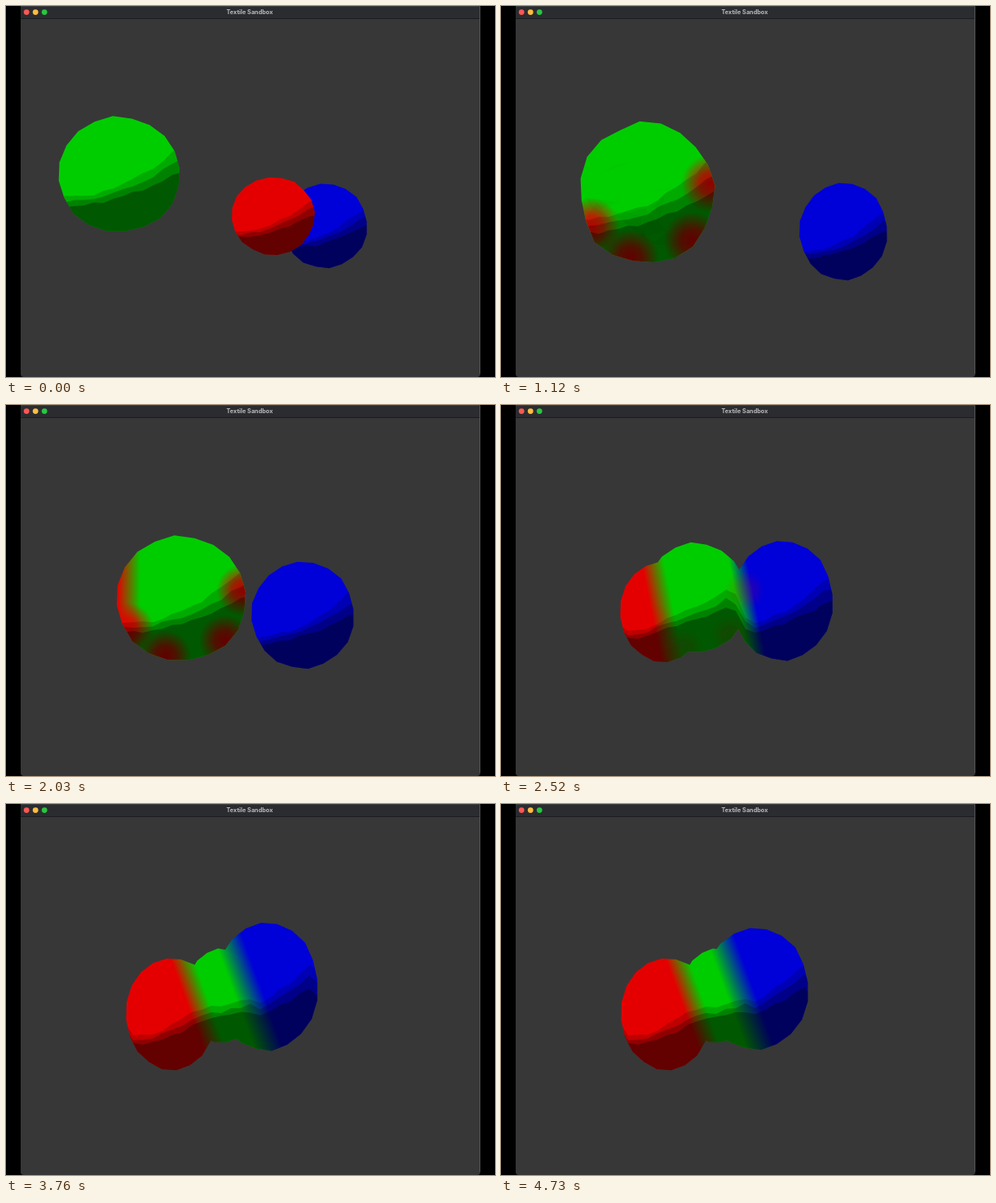
These frames come from a looping animation (600 by 456 pixels, 4.76 s). An HTML page with a canvas:

```html
<!DOCTYPE html>
<html lang="en">
<head>
<meta charset="utf-8">
<title>Textile Sandbox</title>
<style>
html, body { margin: 0; width: 100%; height: 100%; overflow: hidden; background: #000; }
canvas { display: block; }
</style>
</head>
<body>
<canvas id="stage" width="600" height="456"></canvas>
<script>
const ctx = document.getElementById('stage').getContext('2d');
const LOOP = 4760, SPLASH = 480, MERGE = 2250;
const RED = '#e40000', GREEN = '#00cd00', BLUE = '#0000d8';
const RAD = Math.PI / 180;

const clamp = v => Math.max(0, Math.min(1, v));
const noise = n => { const s = Math.sin(n * 127.1 + 3.7) * 43758.5; return (s - Math.floor(s)) * 2 - 1; };

// Key points of each ball: time, centre x and y, half width, half height.
const tracks = {
  red: [
    [0, 328, 258, 51, 48], [SPLASH, 180, 262, 50, 46],
    [2030, 195, 250, 50, 55], [3030, 203, 258, 56, 69]
  ],
  green: [
    [0, 139, 207, 75, 71], [SPLASH, 175, 222, 97, 92], [1120, 179, 230, 83, 87],
    [2030, 215, 238, 80, 77], [3030, 265, 236, 45, 58]
  ],
  blue: [
    [0, 391, 270, 52, 52], [SPLASH, 425, 280, 55, 57], [1120, 420, 277, 54, 60],
    [2030, 364, 258, 63, 66], [3030, 325, 222, 62, 82], [LOOP, 312, 227, 65, 75]
  ]
};

function ballAt(name, time) {
  const keys = tracks[name];
  const next = keys.findIndex(key => key[0] > time);
  const b = next < 0 ? keys[keys.length - 1] : keys[next];
  const a = next < 0 ? b : keys[next - 1];
  const k = next < 0 ? 0 : (time - a[0]) / (b[0] - a[0]);
  const [, x, y, rx, ry] = a.map((v, i) => v + (b[i] - v) * k);
  return { x, y, rx, ry, seed: name.length * 40, lobes: 0 };
}

// Faceted ellipse; the collision throws up five lobes.
function addOutline({ x, y, rx, ry, seed, lobes }) {
  for (let i = 0; i < 20; i++) {
    const a = (18 * i - 78) * RAD;
    const r = 1 + lobes * 0.2 * Math.cos(i * Math.PI / 2) + noise(seed + i) * (0.015 + 0.05 * lobes);
    const px = x + rx * r * Math.cos(a), py = y + ry * r * Math.sin(a);
    i ? ctx.lineTo(px, py) : ctx.moveTo(px, py);
  }
  ctx.closePath();
}

// Bent colour seams halfway between neighbouring balls.
function skin(time, red, green, blue) {
  const mixed = clamp((time - 2030) / 870);
  const tilt = -0.35 * mixed, c = Math.cos(tilt), s = Math.sin(tilt);
  const paint = ctx.createLinearGradient(0, 240, 600 * c, 240 + 600 * s);
  const seam = (x, width, from, to) => {
    paint.addColorStop(clamp((x - width) * c / 600), from);
    paint.addColorStop(clamp((x + width) * c / 600), to);
  };
  seam((red.x + green.x) / 2 - Math.max(0, 2900 - time) / 16, 14, RED, GREEN);
  seam((green.x + blue.x) / 2 + 8, 2 + 16 * mixed, GREEN, BLUE);
  return paint;
}

// Height of the shade edge at x, blended over the balls; band runs from 0 (lit) to 1 (dark).
function shadeEdge(balls, x, band) {
  let sum = 0, total = 0;
  for (const { x: cx, y, rx, ry, lobes } of balls) {
    const u = Math.max(-1, Math.min(1, (x - cx) / rx));
    const lit = 0.2 - 0.45 * u - 0.25 * u * u - 0.35 * lobes;
    const dark = 0.4 - 0.3 * u - 0.15 * u * u + 0.1 * lobes;
    const weight = Math.max(0.001, 1 - u * u);
    sum += weight * (y + ry * (lit + (dark - lit) * band + 0.03 * noise(Math.round(x) + band)));
    total += weight;
  }
  return sum / total;
}

function drawStains({ x, y, rx, ry, lobes }, strength) {
  for (const angle of [150, 105, 45, -8]) {
    const sx = x + rx * 0.95 * Math.cos(angle * RAD), sy = y + ry * 0.95 * Math.sin(angle * RAD);
    const glow = ctx.createRadialGradient(sx, sy, 0, sx, sy, rx * (0.4 + 0.25 * lobes));
    glow.addColorStop(0, `rgba(228,0,0,${strength})`);
    glow.addColorStop(0.4, `rgba(228,0,0,${strength * 0.8})`);
    glow.addColorStop(1, 'rgba(228,0,0,0)');
    rect(glow, 0, 0, 600, 456);
  }
}

// Creases thrown up by the collision.
function drawCreases({ x, y, rx, ry, lobes }) {
  ctx.fillStyle = `rgba(0,0,0,${0.22 * lobes})`;
  for (let i = 0; i < 12; i++) {
    const cx = x + rx * 0.7 * noise(i), cy = y + ry * (0.25 + 0.4 * noise(i + 50));
    ctx.beginPath();
    for (let j = 0; j < 3; j++) {
      ctx.lineTo(cx + 28 * noise(i * 3 + j + 100), cy + 28 * noise(i * 3 + j + 200));
    }
    ctx.fill();
  }
}

function drawBody(balls, paint, stain = 0) {
  ctx.save();
  ctx.beginPath();
  balls.forEach(addOutline);
  ctx.clip();
  rect(paint, 0, 0, 600, 456);
  for (const ball of balls) {
    if (ball.stained && stain > 0) drawStains(ball, stain);
    if (ball.lobes > 0.02) drawCreases(ball);
  }
  [0.17, 0.24, 0.32].forEach((shade, i) => {
    ctx.beginPath();
    ctx.moveTo(0, 456);
    for (let x = 0; x <= 600; x += 12) ctx.lineTo(x, shadeEdge(balls, x, i / 2));
    ctx.lineTo(600, 456);
    ctx.fillStyle = `rgba(0,0,0,${shade})`;
    ctx.fill();
  });
  ctx.restore();
}

function rect(color, x, y, w, h) {
  ctx.fillStyle = color;
  ctx.fillRect(x, y, w, h);
}

function drawWindow() {
  rect('#000', 0, 0, 600, 456);
  ctx.beginPath();
  ctx.roundRect(18, 0, 564, 456, 4);
  ctx.fillStyle = '#373737';
  ctx.fill();
  rect('#2a2c30', 18, 0, 564, 15);
  rect('#4a4b4d', 18, 0, 564, 0.6);
  rect('#1b1c1e', 18, 15, 564, 1);
  rect('#555', 581, 1, 1, 451);
  ['#fc5753', '#fdbc40', '#28c640'].forEach((color, i) => {
    ctx.beginPath();
    ctx.arc(25.2 + 11 * i, 7.6, 3.4, 0, 7);
    ctx.fillStyle = color;
    ctx.fill();
  });
  ctx.font = 'bold 7.3px Inter, sans-serif';
  ctx.textAlign = 'center';
  ctx.fillStyle = '#b8b9ba';
  ctx.fillText('Textile Sandbox', 299, 10);
}

function draw(time) {
  const red = ballAt('red', time), green = ballAt('green', time), blue = ballAt('blue', time);
  const impact = clamp((time - 180) / 300);
  green.lobes = time < SPLASH ? impact : Math.exp((SPLASH - time) / 300);
  green.stained = true;
  const paint = skin(time, red, green, blue);
  const stain = impact * (1 - clamp((time - 2030) / 600));
  drawWindow();
  if (time < MERGE) {
    drawBody([blue], BLUE);
    if (time < SPLASH) drawBody([red], RED);
    drawBody([green], paint, stain);
  } else {
    drawBody([red, green, blue], paint, stain);
  }
}

function tick() {
  draw(performance.now() % LOOP);
  requestAnimationFrame(tick);
}
tick();
</script>
</body>
</html>
```
